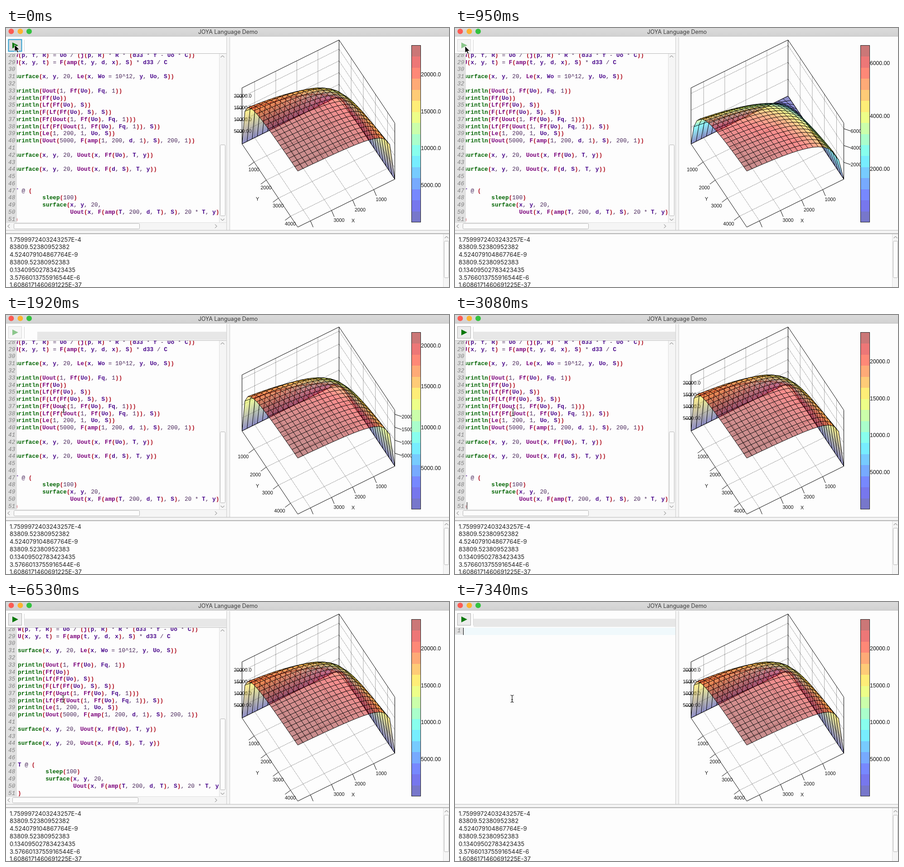
An HTML page with a canvas for the animation above (8000 ms loop, 977 by 573 pixels).

```html
<!DOCTYPE html>
<html lang="en">
<head>
<meta charset="utf-8">
<title>JOYA Language Demo</title>
<style>
html, body { margin: 0; width: 100%; height: 100%; overflow: hidden; background: #fdfdfd; }
#stage { position: relative; width: 977px; height: 573px; overflow: hidden; background: #fdfdfd; }
#stage > * { position: absolute; }
svg, canvas { left: 0; top: 0; }
#title { left: 0; top: 0; width: 977px; height: 18px; background: linear-gradient(#dadada, #d2d2d2);
  border-bottom: 1px solid #c2c2c2; text-align: center;
  font: 12.4px/17px Inter, sans-serif; color: #3c3c3c; }
#title span { position: relative; left: 1px; }
.mono { font: 12.74px/15.78px "Liberation Mono", monospace; white-space: pre; tab-size: 8; }
#gutter { left: 0; top: 57px; width: 24px; height: 373px; overflow: hidden; background: #e1e1e1;
  color: #808080; font-style: italic; }
#gutter div { position: absolute; left: 5px; top: -4.2px; }
#editor { left: 24px; top: 57px; width: 446px; height: 373px; overflow: hidden; color: #4b2a5c; }
#sel { position: absolute; left: 2px; top: 0; width: 443px; height: 357px; background: #c8c8ff; }
#code { position: absolute; left: 2px; top: -4.2px; }
#code b { font-weight: bold; }
.k { color: #006400; } .f { color: #7a007a; } .v { color: #4b0a8c; } .p { color: #b01020; }
#fresh { left: 0; top: 56px; width: 486px; height: 391px; background: #fdfdfd; }
#fresh div { position: absolute; left: 0; top: 1px; width: 486px; height: 16px; background: #f0f9fc; }
#fresh span { position: absolute; left: 0; top: 0; width: 13px; height: 16px; padding-left: 5px;
  background: #e1e1e1; color: #808080; font-style: italic; }
#caret { width: 1px; height: 16px; background: #000; }
#out { left: 8px; top: 459.6px; margin: 0; font: 13.1px/16.8px Inter, sans-serif; color: #222; white-space: pre; }
</style>
</head>
<body>
<div id="stage">
  <canvas id="plot" width="977" height="573"></canvas>
  <div id="title"><span>JOYA Language Demo</span></div>
  <div id="gutter" class="mono"><div id="nums"></div></div>
  <div id="editor" class="mono"><div id="sel"></div><div id="code"></div></div>

  <svg width="977" height="573" fill="none">
    <circle cx="11.5" cy="7.5" r="6" fill="#fc5b53"/>
    <circle cx="31.5" cy="7.5" r="6" fill="#fdb32f"/>
    <circle cx="51" cy="7.5" r="6" fill="#34c240"/>
    <rect id="strip" y="37" width="445" height="18" fill="#e7e7e7"/>
    <path d="M0 56.5H486M0 447.5H977" stroke="#b9b9b9"/>
    <path d="M40.5 26V52" stroke="#d4d4d4"/>
    <rect x="487" y="20" width="6" height="427" fill="#f4f4f4"/>
    <path d="M486.5 20V447M493.5 20V447" stroke="#cdcdcd"/>
    <rect y="448" width="977" height="6" fill="#f4f4f4"/>
    <path d="M0 455H977" stroke="#b4b4b4" stroke-width="2"/>
    <rect id="btn" x="5.5" y="25.5" width="29" height="26"/>
    <path id="play" d="M14 32L27 38.5L14 45Z"/>
    <g id="bars">
      <rect x="470" y="57" width="16" height="390" fill="#f5f5f5"/>
      <rect y="430" width="486" height="17" fill="#f5f5f5"/>
      <path d="M470.5 57V430M0 430.5H486" stroke="#dedede"/>
      <rect x="472.5" y="258.5" width="11" height="157" rx="2" fill="#fcfcfc" stroke="#b4b4b4"/>
      <rect id="thumb" y="432.5" width="277" height="12" rx="2" fill="#fcfcfc" stroke="#b4b4b4"/>
      <path d="M473.5 65L477.5 61L481.5 65M473.5 422L477.5 426L481.5 422M8 434.5L4 438.5L8 442.5M461 434.5L465 438.5L461 442.5"
        stroke="#666"/>
    </g>
    <rect x="964" y="456" width="13" height="117" fill="#f5f5f5"/>
    <path d="M964.5 456V573" stroke="#dedede"/>
    <path d="M967.5 465L971.5 461L975.5 465" stroke="#666"/>
    <rect x="966.5" y="471.5" width="10" height="81" rx="2" fill="#fcfcfc" stroke="#b4b4b4"/>
  </svg>

  <pre id="out">1.7599972403243257E-4
83809.52380952382
4.524079104867764E-9
83809.52380952383
0.13409502783423435
3.5766013755916544E-6
1.6086171460691225E-37</pre>

  <div id="fresh" class="mono"><div></div><span>1</span></div>
  <div id="caret"></div>
  <svg width="977" height="573" fill="none">
    <path id="arrow" d="M0 0V15L3.5 12L6 17.5L8.5 16.3L6 11H10.8Z" fill="#000" stroke="#fff" stroke-width="1"/>
    <g id="beam">
      <path d="M-3.5 -8Q0 -8 0 -5Q0 -8 3.5 -8M0 -6V6M-3.5 8Q0 8 0 5Q0 8 3.5 8M-2 2H2" stroke="#fff" stroke-width="2.6"/>
      <path d="M-3.5 -8Q0 -8 0 -5Q0 -8 3.5 -8M0 -6V6M-3.5 8Q0 8 0 5Q0 8 3.5 8M-2 2H2" stroke="#111" stroke-width="1.2"/>
    </g>
  </svg>
</div>

<script>
const $ = id => document.getElementById(id);
const LOOP = 8000;

// ---- editor text ----
const source = `W(p, f, R) = Uo / (j(p, R) * R * (d33 * f - Uo * C))
U(x, y, t) = F(amp(t, y, d, x), S) * d33 / C

surface(x, y, 20, Le(x, Wo = 10^12, y, Uo, S))

println(Uout(1, Ff(Uo), Fq, 1))
println(Ff(Uo))
println(Lf(Ff(Uo), S))
println(F(Lf(Ff(Uo), S), S))
println(Ff(Uout(1, Ff(Uo), Fq, 1)))
println(Lf(Ff(Uout(1, Ff(Uo), Fq, 1)), S))
println(Le(1, 200, 1, Uo, S))
println(Uout(5000, F(amp(1, 200, d, 1), S), 200, 1))

surface(x, y, 20, Uout(x, Ff(Uo), T, y))

surface(x, y, 20, Uout(x, F(d, S), T, y))


T @ (
\tsleep(100)
\tsurface(x, y, 20,
\t\tUout(x, F(amp(T, 200, d, T), S), 20 * T, y))
)`;
const paint = (cls, s) => `<b class="${cls}">${s}</b>`;
$('code').innerHTML = source.replace(/[A-Za-z]\w*(\(?)|[()]/g, (m, open) => {
  if (m === '(' || m === ')') return paint('p', m);
  const word = open ? m.slice(0, -1) : m;
  const cls = /^(println|surface|sleep)$/.test(word) ? 'k' : open ? 'f' : 'v';
  return paint(cls, word) + (open ? paint('p', '(') : '');
});
$('nums').textContent = source.split('\n').map((_, i) => i + 28).join('\n');

// ---- surface plot ----
const g = $('plot').getContext('2d');
const EXTENT = 4600, HEIGHT = 124, CELLS = 19;
const PEAKS = [6157, 7990, 6660, 3800, 4240, 9840, 16390, 21600, 24490, 23930];
const at = (u, v, z) => [734 - 214 * u + 123 * v, 150 + 106 * u + 184 * v - HEIGHT * z];

function trace(...pts) {
  g.beginPath();
  pts.forEach(p => g.lineTo(p[0], p[1]));
}
function line(...pts) { trace(...pts); g.stroke(); }

function jet(t, alpha) {
  const ch = c => Math.round(255 * Math.max(0, Math.min(1, 1.5 - Math.abs(4 * t - c))));
  return `rgba(${ch(3)},${ch(2)},${ch(1)},${alpha})`;
}
function label(s, x, y, align, size = 10.8) {
  g.font = size + 'px "Liberation Sans", Arial, sans-serif';
  g.textAlign = align;
  g.textBaseline = 'middle';
  g.fillStyle = '#111';
  g.fillText(s, x, y);
}
const num = n => n.toFixed(n < 10000 ? 2 : 1);

// colour runs across the cell, away from the edge a-b
function shade(a, b, c, low, high) {
  const ex = b[0] - a[0], ey = b[1] - a[1], len = ex * ex + ey * ey || 1;
  const d = ((c[1] - a[1]) * ex - (c[0] - a[0]) * ey) / len;
  const fill = g.createLinearGradient(a[0], a[1], a[0] - ey * d, a[1] + ex * d);
  fill.addColorStop(0, jet(low, .44));
  fill.addColorStop(1, jet(high, .44));
  return fill;
}

function drawSurface(k) {
  const rise = (i, j) => {
    const p = i * j / CELLS ** 2;
    return p * (1 + k) / (p + k);
  };
  const corner = (i, j) => at(i / CELLS, j / CELLS, rise(i, j));
  // back to front, each mesh edge once
  for (let i = 0; i < CELLS; i++) {
    for (let j = 0; j < CELLS; j++) {
      const a = corner(i, j), b = corner(i + 1, j), c = corner(i + 1, j + 1), d = corner(i, j + 1);
      const mean = (p, q, r, s) => (rise(p, q) + rise(r, s)) / 2;
      const high = i > j ? mean(i, j + 1, i + 1, j + 1) : mean(i + 1, j, i + 1, j + 1);
      g.fillStyle = i > j
        ? shade(a, b, d, mean(i, j, i + 1, j), high)
        : shade(a, d, b, mean(i, j, i, j + 1), high);
      trace(a, b, c, d);
      g.fill();
      line(b, a, d);
      if (i === CELLS - 1) line(b, c);
      if (j === CELLS - 1) line(d, c);
    }
  }
}

function drawPlot(T) {
  const peak = PEAKS[T - 1], last = T === 10;
  const step = peak > 12000 ? 5000 : peak > 5000 ? 2000 : 1000;
  const marks = [];
  for (let n = step; n < peak; n += step) marks.push(n);

  g.clearRect(0, 0, 977, 573);
  g.save();
  g.beginPath();
  g.rect(494, 20, 401, 427);
  g.clip();
  g.translate(.5, .5);
  g.strokeStyle = '#000';
  g.lineWidth = 1;
  g.lineJoin = 'round';

  g.setLineDash([1, 2]);
  for (let n = 1; n < 5; n++) {
    const a = n * 1000 / EXTENT;
    line(at(a, 0, 1), at(a, 0, 0), at(a, 1, 0));
    line(at(0, a, 1), at(0, a, 0), at(1, a, 0));
  }
  marks.forEach(n => line(at(1, 0, n / peak), at(0, 0, n / peak), at(0, 1, n / peak)));
  g.setLineDash([]);
  line(at(0, 0, 0), at(1, 0, 0), at(1, 0, 1), at(0, 0, 1), at(0, 1, 1), at(0, 1, 0), at(0, 0, 0), at(0, 0, 1));
  line(at(1, 0, 0), at(1, 1, 0), at(0, 1, 0));

  for (let n = 1; n < 5; n++) {
    const a = n * 1000 / EXTENT;
    const [x, y] = at(a, 1, 0), [p, q] = at(1, a, 0);
    line([x, y], [x + 6, y + 14]);
    line([p, q], [p - 12, q + 9]);
    if (n < 4) label(n * 1000, x + 4.5, y + 22, 'left');
    label(n * 1000, p + (last ? -.5 : -24), q + 18, 'center');
  }
  label('X', 765, 427, 'center');
  label('Y', 554, 379, 'center');
  marks.forEach(n => {
    const [x, y] = last ? at(1, 0, n / peak) : at(0, 1, n / peak);
    line([x, y], [x + (last ? -14 : 15), y + (last ? -1 : 5)]);
    if (last) label(num(n), x + 1.5, y - 2, 'center');
    else label(num(n), x + 15, y + 6, 'left');
  });
  drawSurface(.29 / T);
  g.restore();

  // colour bar
  const BANDS = 16, h = 391 / BANDS;
  for (let i = 0; i < BANDS; i++) {
    const top = Math.round(430 - h * (i + 1));
    g.fillStyle = jet((i + .5) / BANDS, .53);
    g.fillRect(895, top, 20, Math.round(430 - h * i) - top);
  }
  g.strokeStyle = '#222';
  g.strokeRect(894.5, 38.5, 20, 391);
  marks.forEach(n => label(num(n), 915, 430.5 - 391 * n / peak, 'left', 12.2));
}

// ---- timeline: [start, value...] ----
const runs = [[0, 10], [500, 1], [650, 2], [870, 3], [1240, 4], [1420, 5], [1620, 6], [1770, 7], [1910, 8], [2060, 9], [2300, 10]];
const pointer = [[0, 19, 37], [140, 22, 40], [1090, 32, 46], [1240, 62, 70], [1420, 90, 101], [1620, 108, 148],
  [1770, 120, 186], [1910, 127, 208], [2060, 128, 215], [4880, 129, 213], [5030, 127, 212], [5480, 126, 212], [5630, 126, 214]];
const caretOn = [[1090, 1620], [2060, 2600], [3080, 3530], [3980, 4580], [4880, 5480], [6080, 6530], [6680, 6980], [7340, 8000]];
const pick = (list, t) => list.filter(e => e[0] <= t).pop();
const show = (id, on) => { $(id).style.visibility = on ? 'visible' : 'hidden'; };

let drawn = 0;
function render(t) {
  const T = pick(runs, t)[1];
  if (T !== drawn) drawPlot(drawn = T);

  const pressed = t < 140, idle = t >= 2300, scrolled = t < 3830, cleared = t >= 7340;
  $('btn').setAttribute('fill', pressed ? '#dcdcdc' : idle ? '#ececec' : '#f5f5f5');
  $('btn').setAttribute('stroke', pressed ? '#2e9fd0' : idle ? '#b0b0b0' : '#d6d6d6');
  $('btn').setAttribute('stroke-width', pressed ? 2 : 1);
  $('play').setAttribute('fill', pressed || idle ? '#087808' : '#8cc68c');
  $('strip').setAttribute('x', idle ? 41 : 69);
  $('strip').setAttribute('width', idle ? 445 : 417);
  show('strip', t >= 1240);

  $('code').style.left = (scrolled ? -4.8 : 2) + 'px';
  $('thumb').setAttribute('x', scrolled ? 17.5 : 14.5);
  show('sel', t >= 6680 && !cleared);
  show('bars', !cleared);
  show('fresh', cleared);

  $('caret').style.left = (cleared ? 18 : scrolled ? 26 : 33) + 'px';
  $('caret').style.top = (cleared ? 57 : 414) + 'px';
  show('caret', caretOn.some(([a, b]) => t >= a && t < b));

  const [, x, y] = pick(pointer, t), overText = t >= 1240;
  for (const id of ['arrow', 'beam']) $(id).setAttribute('transform', `translate(${x} ${y})`);
  show('arrow', !overText);
  show('beam', overText);
}

const began = performance.now();
function tick() {
  render((performance.now() - began) % LOOP);
  requestAnimationFrame(tick);
}
tick();
</script>
</body>
</html>
```
